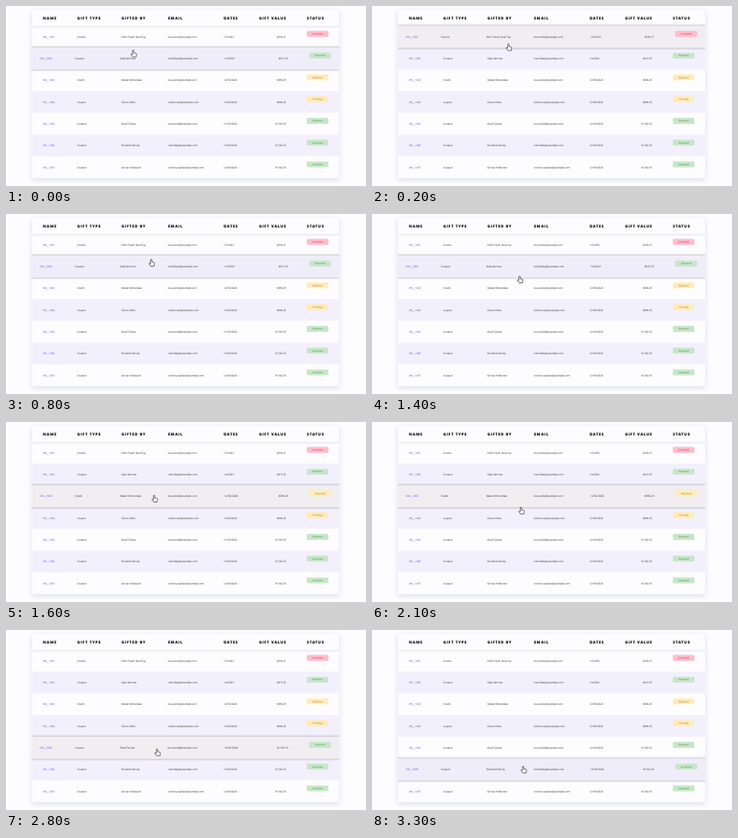
Animation of 450x226 px, one loop 3.4 s. Source, as an HTML page:

```html
<!DOCTYPE html>
<html lang="en">
<head>
<meta charset="utf-8">
<title>Gift table</title>
<style>
html, body { margin: 0; width: 100%; height: 100%; overflow: hidden; background: #fdfcfe; }
svg { display: block; width: 450px; height: 226px; }
text { font: 3.15px "Open Sans", "Noto Sans", sans-serif; fill: #222; text-rendering: geometricPrecision; }
.head text { font-size: 4.8px; font-weight: 800; letter-spacing: .7px; fill: #111; }
.card { fill: #fdfcfe; filter: drop-shadow(0 2px 3px #d9dcec); }
.head rect { fill: #fdfcfe; filter: drop-shadow(0 1.6px 1.7px #dfe1ee); }
.lift { filter: drop-shadow(.2px .5px 1.4px rgba(0, 0, 0, .42)); }
text.link { fill: #5546e0; }
</style>
</head>
<body>
<svg viewBox="0 0 450 226">
  <clipPath id="clip"><rect x="32.5" y="5" width="384" height="211.2"/></clipPath>
  <rect class="card" x="32.5" y="5" width="384" height="211.2"/>
  <g id="table" clip-path="url(#clip)"></g>
  <path id="hand" d="M-.8 .7a.8.8 0 0 1 1.6 0v2.6l2.6.6q1 .3 .8 1.4l-.6 3.2h-4.1l-2.4-3.2q.4-1 1.3-.4l.8.6z"
    fill="#fff" stroke="#333" stroke-width=".75" stroke-linejoin="round"/>
</svg>
<script>
const LEFT = 32.5, WIDTH = 384, TOP = 25, ROW = 27.3, MID = LEFT + WIDTH / 2;
const LOOP = 3400, STEP = 100, FADE = 150;
const columns = [46, 89, 144.3, 202.5, 272, 350, 376];
const pills = {
  pink: ['#ffbccd', '#b92c50'],
  green: ['#c8e6c9', '#388e3c'],
  yellow: ['#ffecb8', '#a07c10'],
};
const titles = ['NAME', 'GIFT TYPE', 'GIFTED BY', 'EMAIL', 'DATES', 'GIFT VALUE', 'STATUS'];
const data = [
  ['Course', 'Edric Pavel, Noel Fay', 'lora.venk', '1/5/2021', '$320.15', 'Accepted', 'pink'],
  ['Coupon', 'Gale Morrow', 'ned.tilbey', '1/4/2021', '$415.25', 'Rejected', 'green'],
  ['Credit', 'Mabel Winterdale', 'lora.venk', '12/30/2020', '$998.29', 'Rejected', 'yellow'],
  ['coupon', 'Orson Felds', 'ottilie.marl', '12/30/2020', '$998.29', 'Pending', 'yellow'],
  ['Coupon', 'Reed Tarlow', 'brisa.keld', '12/18/2020', '$1102.33', 'Rejected', 'green'],
  ['Coupon', 'Rosalind Ostrey', 'ned.tilbey', '12/18/2020', '$1102.33', 'Accepted', 'green'],
  ['Coupon', 'Dorian Pellwood', 'corinna.walden', '12/18/2020', '$1102.33', 'Accepted', 'green'],
];
// [start time, hovered row]
const hovers = [[-FADE, 1], [50, 0], [650, 1], [1450, 2], [2250, 3], [2650, 4], [3150, 5]];
// [time, x, y] of the fingertip
const path = [
  [0, 159, 55.5], [100, 165, 49], [200, 170.5, 47.5], [600, 177.5, 49], [800, 181.5, 57],
  [1200, 183.5, 72], [1400, 184.5, 78], [1700, 185.5, 99], [2000, 185.8, 103], [2100, 186.2, 107],
  [2500, 188, 136.5], [2800, 188.8, 149.5], [3000, 189, 153], [3100, 189, 153], [3300, 189, 171],
  [LOOP, 189, 171],
];

const table = document.getElementById('table');
const hand = document.getElementById('hand');

function add(parent, tag, attrs = {}, content = '') {
  const node = document.createElementNS('http://www.w3.org/2000/svg', tag);
  for (const key in attrs) node.setAttribute(key, attrs[key]);
  node.textContent = content;
  parent.append(node);
  return node;
}

const band = (parent, y, height, attrs) =>
  add(parent, 'rect', { x: LEFT, y, width: WIDTH, height, ...attrs });

const anchor = column => column === 5 ? 'end' : 'start';

function makeRow([type, giver, mail, date, value, status, tone], i) {
  const y = TOP + i * ROW, mid = y + ROW / 2;
  const g = add(table, 'g');
  band(g, y, ROW, { fill: i % 2 ? '#f3f0fd' : '#fdfcfe' });
  const lift = band(g, y, ROW, { fill: i % 2 ? '#f0edfa' : '#f0eef1', class: 'lift' });
  const cells = ['INV__' + (1001 + i), type, giver, mail + '@example.com', date, value];
  cells.forEach((cell, c) => add(g, 'text', {
    x: columns[c], y: mid + 1.1, 'text-anchor': anchor(c), class: c ? '' : 'link',
  }, cell));
  const [back, ink] = pills[tone];
  add(g, 'rect', { x: columns[6], y: mid - 7.3, width: 27, height: 7.4, rx: 1.5, fill: back });
  add(g, 'text', { x: columns[6] + 13.5, y: mid - 2.5, 'text-anchor': 'middle', style: 'fill:' + ink }, status);
  return { g, lift, mid };
}

const rows = data.map(makeRow);
const head = add(table, 'g', { class: 'head' });
band(head, 5, TOP - 5);
titles.forEach((title, c) =>
  add(head, 'text', { x: columns[c] + (c === 5 ? .7 : 0), y: 16.8, 'text-anchor': anchor(c) }, title));

function draw(t) {
  const now = hovers.findLastIndex(([start]) => start <= t);
  const [start, active] = hovers[now];
  const p = Math.min(1, (t - start) / FADE);
  const eased = p * p * (3 - 2 * p);
  const previous = now ? hovers[now - 1][1] : -1;
  rows.forEach(({ g, lift, mid }, i) => {
    const amount = i === active ? eased : i === previous ? 1 - eased : 0;
    const scale = 1 + .02 * amount;
    g.setAttribute('transform', `translate(${MID} ${mid}) scale(${scale}) translate(${-MID} ${-mid})`);
    lift.setAttribute('opacity', amount);
  });
  table.append(head, rows[active].g);

  const k = path.findIndex(([time]) => time > t);
  const [t0, x0, y0] = path[k - 1], [t1, x1, y1] = path[k];
  const f = (t - t0) / (t1 - t0);
  hand.setAttribute('transform', `translate(${x0 + (x1 - x0) * f} ${y0 + (y1 - y0) * f})`);
}

const origin = performance.now();
function tick() {
  const t = (performance.now() - origin) % LOOP;
  draw(Math.floor(t / STEP) * STEP);
  requestAnimationFrame(tick);
}
tick();
</script>
</body>
</html>
```
